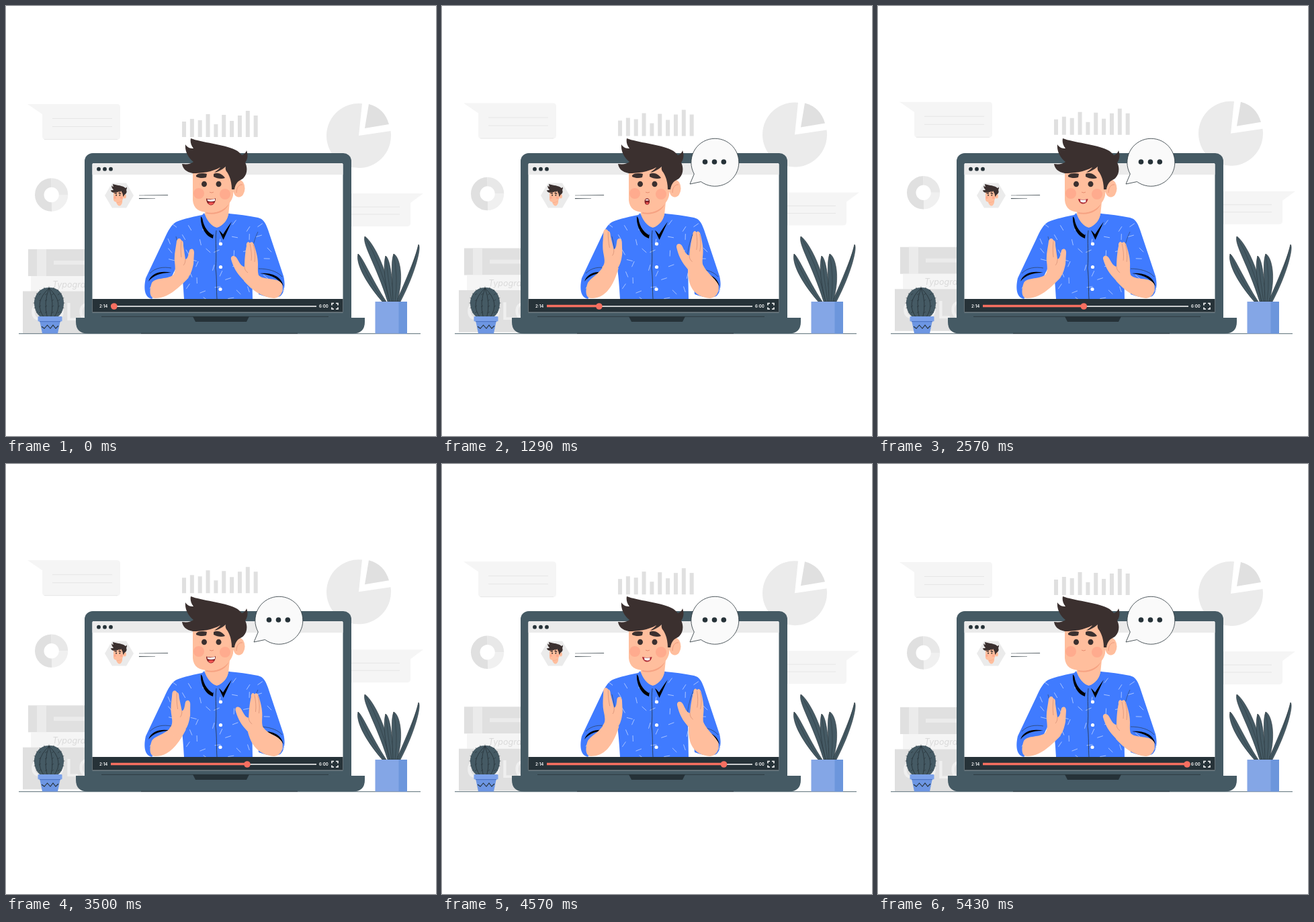
An HTML page for the animation above (5.5 s loop, 640 by 640 pixels).

```html
<!DOCTYPE html>
<html lang="en">
<head>
<meta charset="utf-8">
<title>Video lesson</title>
<style>
html, body { margin: 0; width: 100%; height: 100%; overflow: hidden; background: #fff; }
svg { display: block; width: 100vw; height: 100vh; }
.time { font: 600 6px Inter, sans-serif; fill: #fff; }
</style>
</head>
<body>
<svg viewBox="0 0 640 640">
  <defs>
    <path id="shirtShape" d="M297 310C280 313 264 317 254 321C246 325 241 335 236 346L208 405C205 418 205 434 217 436L246 404L259 378C263 400 264 420 265 436H367L366 386L373 400L376 429C388 433 398 436 408 432C415 426 416 414 413 402L390 333C386 322 383 317 375 315C360 312 345 310 332 309Z"/>
    <clipPath id="shirtClip"><use href="#shirtShape"/></clipPath>
    <g id="head">
      <path d="M296 296V311C300 322 308 330 314 330C322 329 329 320 331 311L334 282Z" fill="#ffbe9d"/>
      <path d="M298 307C312 310 325 304 332 294C328 305 315 312 298 309Z" fill="#f6a282"/>
      <ellipse cx="346.500" cy="271.500" rx="9" ry="13" fill="#ffbe9d"/>
      <path d="M343 278C343 270 347 265 352 266" fill="none" stroke="#e78c70" stroke-width=".7"/>
      <path d="M278 240V289C279 302 288 307 301 307C319 306 334 298 338 282L341 240Z" fill="#ffbe9d"/>
      <circle cx="287" cy="279" r="8" fill="#ffab8e"/>
      <circle cx="326" cy="280" r="8" fill="#ffab8e"/>
      <path d="M275 197C290 203 325 206 341 214C346 216 349 220 351 222C355 221 357 218 358 215C361 223 359 229 356 233C361 243 358 255 349 259C343 262 341 267 340 273L336 273C336 262 333 252 328 246Q326 243 327 239C321 244 315 247 310 248C315 244 318 242 319 240C307 247 291 249 278 249C268 247 263 242 262 235C270 236 275 235 279 232C271 226 266 216 267 206C270 211 274 212 279 212C275 207 274 202 275 197Z" fill="#3b302f"/>
      <g fill="#3b302f">
        <path d="M283 252C287 248 295 249 299 250L298 255C293 257 287 256 283 254Z"/>
        <path d="M309 250C315 247 322 250 326 256C321 258 314 257 309 254Z"/>
        <ellipse cx="295" cy="265" rx="4" ry="4.300"/>
        <ellipse cx="316.500" cy="265" rx="4" ry="4.300"/>
      </g>
      <path d="M303 277Q306 279 309 277" fill="none" stroke="#e78c70" stroke-width="1"/>
    </g>
  </defs>

  <g id="back">
    <path d="M32 146H165Q170 146 170 151V194Q170 199 165 199H59Q54 199 54 194V161Z" fill="#f5f5f5"/>
    <path d="M57 198.500H166M69 167.500H158M69 179.500H158" stroke="#e3e3e3" stroke-width=".8"/>
    <g id="bars" fill="#e0e0e0"></g>
    <path d="M525 193L530 145.300A48 48 0 1 0 572.500 186Z" fill="#ebebeb"/>
    <path d="M534 182L540 146Q563 152 570 176Z" fill="#e0e0e0"/>
    <g fill="none" stroke-width="13.500">
      <path d="M67.500 263A18 18 0 0 1 85.500 281" stroke="#e8e8e8"/>
      <path d="M85.500 281A18 18 0 0 1 67.500 299" stroke="#f0f0f0"/>
      <path d="M68 299A18 18 0 0 1 67.500 263" stroke="#e0e0e0"/>
    </g>
    <path d="M500 279H621L602 293V323Q602 328 597 328H500Z" fill="#f5f5f5"/>
    <path d="M505 299H586M505 310H586" stroke="#e3e3e3" stroke-width=".8"/>
    <path d="M33 362H125V402H33Z" fill="#e0e0e0"/>
    <path d="M46 362H60V402H46ZM71 379H125V385H71Z" fill="#ebebeb"/>
    <path d="M37 402H125V424.500H37Z" fill="#f5f5f5"/>
    <text x="69" y="418.500" fill="#dadada" font-family="Inter, sans-serif" font-size="12.500" font-style="italic">Typography</text>
    <path d="M25 424.500H125V487H25Z" fill="#e0e0e0"/>
    <text x="36" y="468" fill="#efefef" font-family="'Open Sans', sans-serif" font-size="37" font-weight="600">COLOR</text>
  </g>

  <path d="M19 487.700H617" stroke="#455a64" stroke-width=".9"/>
  <g id="cactus">
    <path d="M64 419C79 418 87 431 86 444C85 458 78 466 64 466C50 466 43 457 42 443C42 430 50 419 64 419Z" fill="#455a64"/>
    <g id="ribs" fill="none" stroke="#263238" stroke-width=".8"></g>
    <path d="M50 468H81L77 487.500H54Z" fill="#6d96e3"/>
    <rect x="47.500" y="462" width="36" height="7.500" rx="1" fill="#7ba1ea"/>
    <path d="M50 469.700H81" stroke="#466fbe" stroke-width="1"/>
    <path d="M53 477L57 480L61.500 475L66 480L70 475L74 480L78 476" fill="none" stroke="#263238" stroke-width="1.100"/>
  </g>
  <g id="leaves" fill="#455a64" stroke="#263238" stroke-width=".6"></g>
  <path d="M549.500 440H597V487.500H549.500Z" fill="#84a6e6"/>
  <path d="M584.500 440H597V487.500H584.500Z" fill="#6c96dc"/>

  <rect x="117" y="219" width="397" height="260" rx="12" fill="#455a64"/>
  <rect x="128.500" y="234" width="373" height="222" rx="1.500" fill="#fff"/>
  <path d="M128.500 251V236Q128.500 234 131 234H499Q501.500 234 501.500 236V251Z" fill="#ebebeb"/>
  <g fill="#263238"><circle cx="138" cy="242.700" r="2.900"/><circle cx="147" cy="242.700" r="2.900"/><circle cx="156" cy="242.700" r="2.900"/></g>
  <path d="M147 282L158 263.500H179L190 282L179 300.500H158Z" fill="#ebebeb"/>
  <use href="#head" transform="translate(91.800 216.700) scale(.245)"/>
  <path d="M198 281.900L241 281.200V281.700ZM198 286.300L222 286.500L198 286.900Z" fill="#263238" stroke="#263238" stroke-width=".25"/>

  <g id="man">
    <use href="#shirtShape" fill="#407bff"/>
    <g id="dashes" clip-path="url(#shirtClip)" stroke="#d5e2ff" stroke-width=".7"></g>
    <path d="M253 343C256 355 258 366 259 378M365 386C364 370 368 350 375 336" fill="none" stroke="#263238" stroke-width=".5"/>
    <path d="M290 313C289 327 296 342 308 346L309 338ZM336 321L323.500 348L317 334L324 337Z" fill="#000"/>
    <use href="#head"/>
    <path d="M295 308C299 320 306 328 314 330L308 341C299 336 292 325 292 311ZM332 308C330 319 323 327 314 330L323 340L335 321Z" fill="#407bff"/>
    <path d="M313 334C311 350 314 370 312 390C314 406 313 423 314 436" fill="none" stroke="#263238" stroke-width=".8"/>
    <g fill="#fff"><circle cx="319.500" cy="354" r="2.600"/><circle cx="319.500" cy="388.500" r="2.600"/><circle cx="319" cy="421.500" r="2.600"/></g>
    <path d="M214 398C223 389 234 388 246 390M376 391C389 391 403 394 411 403" fill="none" stroke="#263238" stroke-width=".6"/>
    <path d="M212 410C217 396 232 394 246 397C232 396.500 220 400 212 410ZM378 398C392 397 409 400 413 417C404 403 391 400 378 398Z" fill="#000"/>
    <g id="armL" fill="#ffbe9d">
      <path/>
      <g>
        <path d="M247 402C253 397 252 390 251 380C250 370 253 359 254 350C255 345 260 345 261 349C264 349 264 353 264 357L267 377C271 376 271 371 273 364C275 360 280 361 280 367L279 384C277 393 275 401 268 408L253 413Z"/>
        <path d="M261 350C260 358 260 366 261 374M267 377C267 381 266 384 264 386" fill="none" stroke="#c47a62" stroke-width=".5"/>
      </g>
    </g>
    <g id="armR" fill="#ffbe9d">
      <path/>
      <g>
        <path d="M378 404C374 399 375 392 375 384C375 374 372 364 369 355C367 350 364 351 363 353C361 349 357 352 358 357C356 366 355 378 355 388C350 388 347 381 344 376C341 370 334 371 335 377C338 387 342 395 348 402L358 413L376 415Z"/>
        <path d="M363 354C365 363 366 371 365 379M368 355C371 365 371 373 370 381M355 388C355 392 357 395 360 397" fill="none" stroke="#c47a62" stroke-width=".5"/>
      </g>
    </g>
    <g class="mouth" data-shape="S">
      <path d="M298 286.500C303 288 308 288 312 286C312 292 309 296.500 305 296.500C301 296 298 292 298 286.500Z" fill="#7e1f25"/>
      <path d="M299.500 287.500Q305 289 311 287V290Q305 292 300 290Z" fill="#fff"/>
      <path d="M301 293Q305 291 310 293Q308 296 305 296Q302 296 301 293Z" fill="#ef5350"/>
    </g>
    <g class="mouth" data-shape="O">
      <ellipse cx="305.300" cy="291" rx="3.800" ry="4.800" fill="#7e1f25"/>
      <path d="M303 293Q305 291 308 293Q307 295.300 305 295.300Q304 295 303 293Z" fill="#ef5350"/>
      <path d="M303 288Q305 287 307.500 288V289.500H303Z" fill="#fff"/>
    </g>
    <g class="mouth" data-shape="T">
      <path d="M298 287C303 288.500 308 288.500 312.500 287C312 291.500 309 294.500 305 294.500C301 294 298.500 291 298 287Z" fill="#b02f38"/>
      <path d="M301 288.300Q305 289 309.500 288.300L309 292L305.300 292.500L301.500 291.500Z" fill="#fff"/>
      <path d="M305.300 288.500V292.500" stroke="#ddd" stroke-width=".5"/>
    </g>
  </g>

  <path d="M128.500 436H501.500V456H128.500Z" fill="#263238"/>
  <path d="M128.500 456H501.500" stroke="#a4adb1" stroke-width=".8"/>
  <path d="M156 447H462" stroke="#fff" stroke-width="1.600"/>
  <path id="played" stroke="#f66f60" stroke-width="3.600"/>
  <circle id="knob" cy="447" r="4.800" fill="#f66f60"/>
  <text class="time" x="139" y="449">2:14</text>
  <text class="time" x="466" y="448.500">6:00</text>
  <path d="M485 445.500V442.500H488M491 442.500H494V445.500M494 448.500V451H491M488 451H485V448.500" fill="none" stroke="#fff" stroke-width="1.600"/>
  <path d="M104 464H534V470Q534 487.500 516 487.500H122Q104 487.500 104 470Z" fill="#455a64"/>
  <path d="M142 462.300H480M201 487.300H434" stroke="#263238" stroke-width=".8"/>
  <path d="M278 462H362L358 470H282Z" fill="#263238"/>

  <g id="bubble">
    <path d="M375.300 250A35.500 35.500 0 1 1 385.500 261.500L369 265Z" fill="#fafafa" stroke="#263238" stroke-width=".8"/>
    <g fill="#263238"><circle cx="391.500" cy="232" r="3.800"/><circle cx="405.500" cy="232" r="3.800"/><circle cx="419.300" cy="232" r="3.800"/></g>
  </g>
</svg>
<script>
const LOOP = 5500;
const $ = id => document.getElementById(id);
const put = (id, html) => { $(id).innerHTML = html; };

put('bars', [23, 27, 25, 34, 19, 33, 24, 32, 39, 32]
  .map((h, i) => `<rect x="${262 + i * 11.85}" y="${195 - h}" width="6" height="${h}"/>`).join(''));

// Plant leaves: base x, tip, bend point, width
put('leaves', [
  [584, 614, 355, 605, 397, 9],
  [563, 524, 369, 538, 407, 13],
  [571, 534, 343, 558.5, 384, 16],
  [574, 565, 372, 568.5, 404, 13],
  [579, 577, 369, 584, 404, 18]
].map(([x, tx, ty, cx, cy, w]) =>
  `<path d="M${x - 3} 440C${cx - w / 2} ${cy} ${tx - w / 4} ${ty + 12} ${tx} ${ty}` +
  `C${tx + w / 2} ${ty + 4} ${cx + w / 2} ${cy} ${x + 3} 440Z"/>` +
  `<path fill="none" stroke-width=".5" d="M${x} 440Q${cx} ${cy} ${tx} ${ty}"/>`).join(''));

let ribs = '';
for (const k of [-14, -5, 5, 14]) {
  ribs += `<path d="M64 420Q${64 + k * 1.7} 442 ${64 + k * .5} 464"/>`;
  for (let y = 430; y < 460; y += 9) ribs += `<path stroke-width=".6" d="M${63 + k} ${y}l3 -2"/>`;
}
for (let i = 0; i < 20; i++) {
  const a = i * Math.PI / 10;
  const c = Math.cos(a), s = Math.sin(a);
  if (s < .8) ribs += `<path stroke-width=".6" d="M${64 + 21 * c} ${442 + 22 * s}l${2.5 * c} ${2.5 * s}"/>`;
}
put('ribs', ribs);

let seed = 7;
const rand = () => (seed = seed * 16807 % 2147483647) / 2147483647;
let dashes = '';
for (let y = 318; y < 436; y += 19) {
  for (let x = 212; x < 415; x += 24) {
    const a = rand() * Math.PI, px = x + rand() * 15, py = y + rand() * 11;
    dashes += `<path d="M${px} ${py}l${9 * Math.cos(a)} ${9 * Math.sin(a)}"/>`;
  }
}
put('dashes', dashes);

// Hands: time, left dx, dy, turn, right dx, dy, turn
const poses = [
  [0, 0, 0, 0, 0, 0, 0],
  [790, -8, -11.5, -5, 9, -13, 3],
  [1330, -9, -14, -5, 12, -16, 4],
  [1860, -2.5, -11, 0, 7.5, -12, 2],
  [2620, 0, 0, 0, 0, 0, 0],
  [3500, -4, -9, -3, 6, -10, 1],
  [4050, -8, -13, -5, 11, -15, 4],
  [4570, -8.5, -13.5, -6, 13, -16.5, 4],
  [5430, 0, 0, 0, 0, 0, 0],
  [5500, 0, 0, 0, 0, 0, 0]
];
const last = poses.length - 1;
const slope = (i, c) => i === 0 || i >= last - 1 ? 0
  : (poses[i + 1][c] - poses[i - 1][c]) / (poses[i + 1][0] - poses[i - 1][0]);

function pose(t) {
  let i = 0;
  while (i < last - 1 && t >= poses[i + 1][0]) i++;
  const a = poses[i], b = poses[i + 1], span = b[0] - a[0], u = (t - a[0]) / span;
  return a.slice(1).map((v, k) => {
    const c = k + 1, w = u * u * (3 - 2 * u);
    return v + (b[c] - v) * w + span * u * (1 - u) * (slope(i, c) * (1 - u) - slope(i + 1, c) * u);
  });
}

function setArm(id, forearm, dx, dy, turn, cx, cy) {
  const [arm, hand] = $(id).children;
  arm.setAttribute('d', forearm);
  hand.setAttribute('transform', `translate(${dx} ${dy}) rotate(${turn} ${cx} ${cy})`);
}

const speech = 'STSOSTOTSOTSTOSTSOTSOTSOS ';
const mouths = document.querySelectorAll('.mouth');

function draw(t) {
  const lift = -1.65 * (1 - Math.cos(2 * Math.PI * t / LOOP));
  $('back').setAttribute('transform', `translate(0 ${lift})`);

  const x = Math.min(460, 160.8 + .0566 * t);
  $('knob').setAttribute('cx', x);
  $('played').setAttribute('d', `M156 446.500H${x}`);

  const grow = Math.max(0, Math.min(1, (t - 345) / 610));
  $('bubble').setAttribute('transform', `translate(375 259) scale(${grow}) translate(-375 -259)`);

  const [lx, ly, lr, rx, ry, rr] = pose(t);
  setArm('armL', `M${251 + lx} ${399 + ly}C${241 + lx} ${408 + ly / 2} 223 403 217 412C213 423 213 435 222 435C239 435 253 424 ${272 + lx} ${404 + ly}Z`,
    lx, ly, lr, 258, 400);
  setArm('armR', `M${376 + rx} ${401 + ry}C${385 + rx} ${409 + ry / 2} 405 403 411 414C414 425 408 435 398 435C380 433 366 423 ${354 + rx} ${409 + ry}Z`,
    rx, ry, rr, 366, 404);

  const shape = speech[Math.min(speech.length - 1, Math.floor(t / 214))];
  mouths.forEach(m => { m.style.display = m.dataset.shape === shape ? '' : 'none'; });
}

const start = performance.now();
function tick() {
  draw((performance.now() - start) % LOOP);
  requestAnimationFrame(tick);
}
tick();
</script>
</body>
</html>
```
